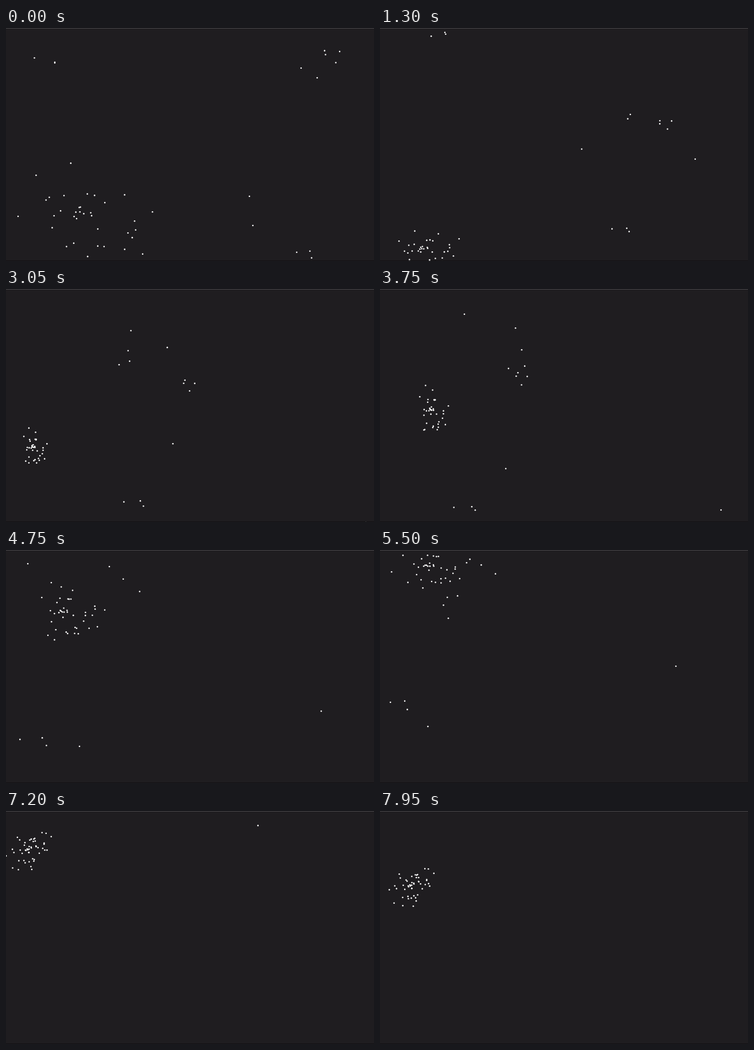
Write an HTML page with a canvas that moves like this. It is 641x407 px and loops after 8000 ms.

```html
<!DOCTYPE html>
<html lang="en">
<head>
<meta charset="utf-8">
<title>Flock</title>
<style>
  html, body { margin: 0; width: 100%; height: 100%; overflow: hidden; background: #1f1d20; }
  canvas { display: block; }
</style>
</head>
<body>
<canvas id="stage" width="641" height="407"></canvas>
<script>
const LOOP = 8000, STEP = 50, TAU = 2 * Math.PI;
const ctx = document.getElementById('stage').getContext('2d');

// A pose is: time in seconds, centre x, centre y, radius x, radius y, tilt.
// All birds but one end up in this gathered formation.
const gathered = [
  [7.2, 40, 67, 44, 38, -.5],
  [7.7, 43, 111, 44, 38, -.5],
  [7.95, 55, 130, 44, 38, -.5]
];

const mainFlock = [
  [0, 135, 325, 150, 90, .25],
  [1.3, 76, 386, 75, 36, -.1],
  [2.3, 13, 338, 32, 28, .1],
  [3.75, 90, 212, 34, 48, .1],
  [4.75, 101, 109, 62, 60, 0],
  [6, 74, -14, 80, 34, 0],
  [6.4, 64, 4, 85, 30, -.1]
];
const eastGroup = [
  [0, 560, 45, 28, 20, -.1],
  [1.3, 490, 166, 24, 13, -.1],
  [3.75, 239, 151, 24, 15, .3],
  [4.75, 152, 111, 28, 24, 0]
];
const southGroup = [
  [0, 530, 396, 40, 20, 0],
  [1.3, 429, 353, 42, 10, 0],
  [2.3, 314, 358, 42, 24, 0],
  [3.75, 156, 384, 46, 12, 0],
  [4.75, 57, 337, 55, 30, 0],
  [6.4, 35, 183, 12, 40, 0]
];
const northGroup = [
  [0, 73, 57, 32, 4, .3],
  [.8, 85, -16, 24, 6, 0],
  [2.3, 159, 93, 18, 16, 0],
  [3.75, 244, 129, 22, 55, 0],
  [4.75, 200, 68, 90, 40, 0],
  [6.4, 140, 19, 24, 16, 0]
];

// Birds that fly alone have no radius until they join the others.
const joining = [
  [[0, 514, 70], [2.3, 360, 222], [4.75, 128, 343], [6.4, 52, 212]],
  [[0, 424, 294], [1.3, 436, 151], [2.3, 334, 134], [4.75, 180, 29], [6.4, 124, 21]],
  [[0, 430, 345], [2.3, 284, 119], [3.75, 147, 44], [4.75, 38, 24]]
];
const loner = [
  [0, 542, 87], [1.3, 549, 229], [2.3, 601, 336], [2.95, 628, 404],
  [3.58, 602, 404], [3.75, 594, 386], [6.4, 475, 109], [7.95, 405, -53]
];

function seededRandom(seed) {
  return () => {
    seed = (seed + 0x6D2B79F5) | 0;
    let h = Math.imul(seed ^ (seed >>> 15), 1 | seed);
    h = (h + Math.imul(h ^ (h >>> 7), 61 | h)) ^ h;
    return ((h ^ (h >>> 14)) >>> 0) / 2 ** 32;
  };
}
const random = seededRandom(11);

// Each bird circles slowly around the centre of its group.
function makeGroup(count, path) {
  const birds = Array.from({ length: count }, (_, i) => ({
    angle: TAU * (i + random()) / count,
    spin: .4 * (random() - .5),
    distance: random()
  }));
  return { path, birds };
}

const groups = [
  makeGroup(35, [...mainFlock, ...gathered]),
  makeGroup(4, [...eastGroup, ...gathered]),
  makeGroup(3, [...southGroup, ...gathered]),
  makeGroup(3, [...northGroup, ...gathered]),
  ...joining.map(path => makeGroup(1, [...path, ...gathered])),
  makeGroup(1, loner)
];

const value = (pose, part) => pose[part] ?? 0;

function slope(path, i, part) {
  const a = path[Math.max(i - 1, 0)];
  const b = path[Math.min(i + 1, path.length - 1)];
  return (value(b, part) - value(a, part)) / (b[0] - a[0]);
}

// Cubic Hermite curve through the poses of a path.
function poseAt(path, t) {
  let i = 0;
  while (i < path.length - 2 && t >= path[i + 1][0]) i++;
  const a = path[i], b = path[i + 1];
  const span = b[0] - a[0];
  const u = Math.min((t - a[0]) / span, 1);
  const v = 1 - u;
  const [x, y, radiusX, radiusY, tilt] = [1, 2, 3, 4, 5].map(part =>
    v * v * (1 + 2 * u) * value(a, part) + u * u * (3 - 2 * u) * value(b, part)
    + span * u * v * (v * slope(path, i, part) - u * slope(path, i + 1, part)));
  return { x, y, radiusX, radiusY, tilt };
}

function drawBird(bird, pose, t) {
  const angle = bird.angle + bird.spin * t;
  const dx = pose.radiusX * bird.distance * Math.cos(angle);
  const dy = pose.radiusY * bird.distance * Math.sin(angle) + pose.tilt * dx;
  ctx.beginPath();
  ctx.arc(pose.x + dx, pose.y + dy, 1.3, 0, TAU);
  ctx.fill();
}

function fillRow(y, height, color) {
  ctx.fillStyle = color;
  ctx.fillRect(0, y, 641, height);
}

function draw(now) {
  const t = Math.floor((now % LOOP) / STEP) * STEP / 1000;
  fillRow(0, 407, '#1f1d20');
  fillRow(0, 1, '#48474a');
  fillRow(406, 1, '#121113');
  ctx.fillStyle = '#fff';
  for (const { path, birds } of groups) {
    const pose = poseAt(path, t);
    for (const bird of birds) drawBird(bird, pose, t);
  }
}

const begin = performance.now();
function tick() {
  draw(performance.now() - begin);
  requestAnimationFrame(tick);
}
tick();
</script>
</body>
</html>
```
